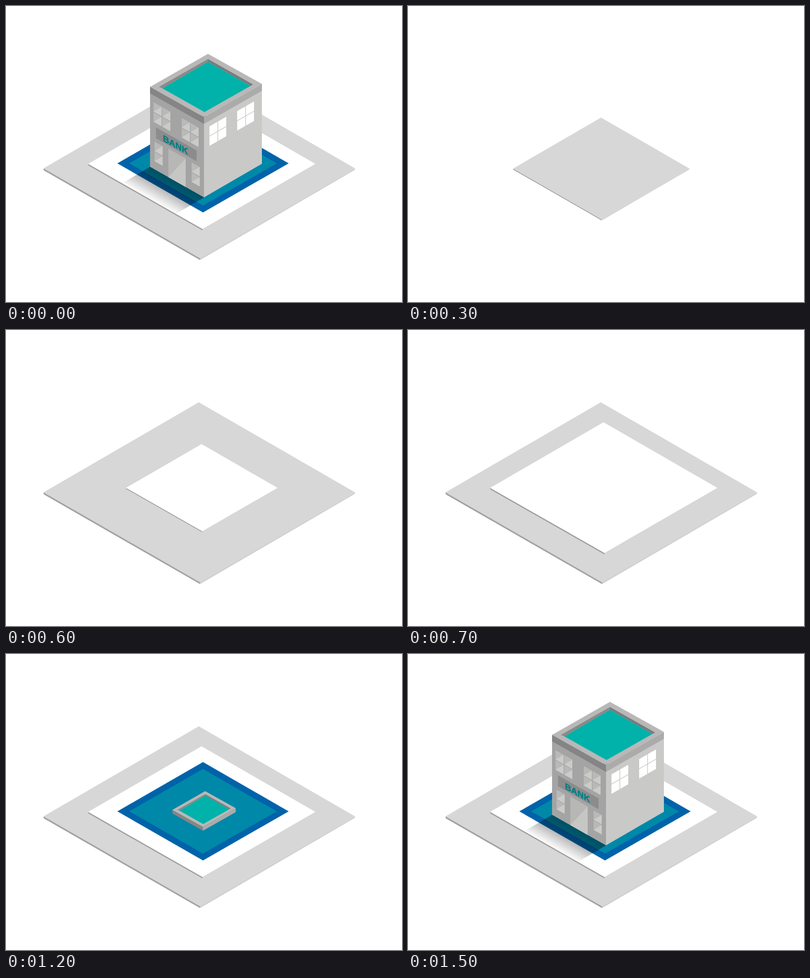
An HTML page for the animation above (2.1 s loop, 800 by 600 pixels).

```html
<!DOCTYPE html>
<html lang="en">
<head>
<meta charset="utf-8">
<title>Isometric bank</title>
<style>
  html, body { margin: 0; width: 100%; height: 100%; overflow: hidden; background: #fff; }
  svg { display: block; width: 100%; height: 100%; }
  text { font: bold 17.5px "Liberation Sans", Arial, sans-serif; }
</style>
</head>
<body>
<svg viewBox="0 0 800 600">
  <defs>
    <linearGradient id="shade" gradientUnits="userSpaceOnUse" x1="346" y1="357" x2="319" y2="404">
      <stop offset="0" stop-opacity=".42"/>
      <stop offset=".45" stop-opacity=".3"/>
      <stop offset="1" stop-opacity=".03"/>
    </linearGradient>
    <clipPath id="aboveGround"><path d="M291 0V326L400 388L517 320V0Z"/></clipPath>
  </defs>

  <g id="plot">
    <path fill="#a3a3a3" d="M76 329L392 511V515L76 333Z"/>
    <path fill="#d0d0d0" d="M392 511L705 329V332L392 515Z"/>
    <path fill="#d7d7d7" d="M389.5 146.5L705 329L392 511.500L76 329Z"/>
  </g>
  <g id="slab">
    <path fill="#a0a0a0" d="M166 320L397 452V455L166 323Z"/>
    <path fill="#fff" d="M395 187L625 320L397 452L166 320Z"/>
  </g>
  <path id="border" fill="#0063aa" d="M398 219L571 319L398 418.500L225 319Z"/>
  <path id="floor" fill="#0088a8" d="M398 233L547 319L398 404.500L249 319Z"/>
  <path id="shadow" fill="url(#shade)" d="M237 358L291 326L400 388L344 421Z"/>

  <g id="building" clip-path="url(#aboveGround)">
    <g id="walls">
      <path fill="#a5a4a4" d="M291 170L400 232V388L291 326Z"/>
      <path fill="#c9c9c7" d="M400 232L517 165V320L400 388Z"/>
      <g id="windows"></g>
      <g transform="matrix(1 .569 0 1 303 246)">
        <path fill="#8d8c8c" d="M0 0H82V22H0Z"/>
        <text x="14" y="19" fill="#007f85" stroke="#007f85" stroke-width=".6">BANK</text>
      </g>
      <g transform="matrix(1 .569 0 1 328 289)">
        <path fill="#b7b7b6" d="M0 0H35V58H0Z"/>
        <path fill="#c6c6c5" d="M35 0V58H0Z"/>
      </g>
    </g>
  </g>

  <g id="roof">
    <path fill="#858585" d="M291 163.500L400 225V239L291 177Z"/>
    <path fill="#acabab" d="M400 225L517 158V172L400 239Z"/>
    <path fill="#b9b8b8" d="M408 97L517 158L400 225L291 164Z"/>
    <path fill="#8b8989" d="M408 107.500L309 164L316 167L408 113Z"/>
    <path fill="#7d7a7a" d="M408 107.500L499 159L494 162L408 113Z"/>
    <path fill="#00b2a9" d="M408 113L494 162L401 215L316 167Z"/>
  </g>
</svg>
<script>
const byId = id => document.getElementById(id);
const STEP = 100, LOOP = 2100, HEIGHT = 150;

// x, y, columns, on the left wall?
const windows = [
  [298, 195, 2, true], [355, 227, 2, true], [300, 275, 1, true], [375, 317, 1, true],
  [411, 244, 2, false], [467, 213, 2, false]
];

function windowMarkup([x, y, columns, left]) {
  let panes = "";
  for (let col = 0; col < columns; col++) {
    for (let row = 0; row < 2; row++) {
      const px = col * 17.7, py = row * 20.5;
      panes += `<path fill="${left ? "#b9b9b8" : "#fff"}" d="M${px} ${py}h16.300v19h-16.300z"/>`;
      if (left) panes += `<path fill="#cbcbca" d="M${px + 16.3} ${py}v19h-16.300z"/>`;
    }
  }
  return `<g transform="matrix(1 ${left ? .569 : -.573} 0 1 ${x} ${y})">${panes}</g>`;
}
byId("windows").innerHTML = windows.map(windowMarkup).join("");

// Each part: centre of growth, first step, and its sizes from that step on.
const parts = [
  { id: "plot", cx: 390.5, cy: 330, start: 3, sizes: [.566, 1] },
  { id: "slab", cx: 395.5, cy: 320, start: 5, sizes: [.333, .667, 1] },
  { id: "border", cx: 398, cy: 319, start: 8, sizes: [.566, 1] },
  { id: "floor", cx: 398, cy: 319, start: 10, sizes: [.566, 1] },
  { id: "roof", cx: 395, cy: 318.4, start: 12, sizes: [.566, 1] }
];
const RISE_START = 13, RISE_STEPS = 2;

function show(id, visible) {
  byId(id).setAttribute("visibility", visible ? "visible" : "hidden");
}

function draw(time) {
  const now = Math.floor((time % LOOP) / STEP);
  const step = now === 0 ? LOOP / STEP : now;
  const rise = Math.min(1, Math.max(0, (step - RISE_START) / RISE_STEPS));
  const drop = HEIGHT * (1 - rise);

  for (const { id, cx, cy, start, sizes } of parts) {
    const size = sizes[Math.min(Math.max(step - start, 0), sizes.length - 1)];
    const lift = id === "roof" ? drop : 0;
    show(id, step >= start);
    byId(id).setAttribute("transform",
      `translate(${cx} ${cy}) scale(${size}) translate(${-cx} ${lift - cy})`);
  }
  byId("walls").setAttribute("transform", `translate(0 ${drop})`);
  show("building", rise > 0);
  show("shadow", rise === 1);
}

const begin = performance.now();
function tick() {
  draw(performance.now() - begin);
  requestAnimationFrame(tick);
}
draw(0);
requestAnimationFrame(tick);
</script>
</body>
</html>
```
